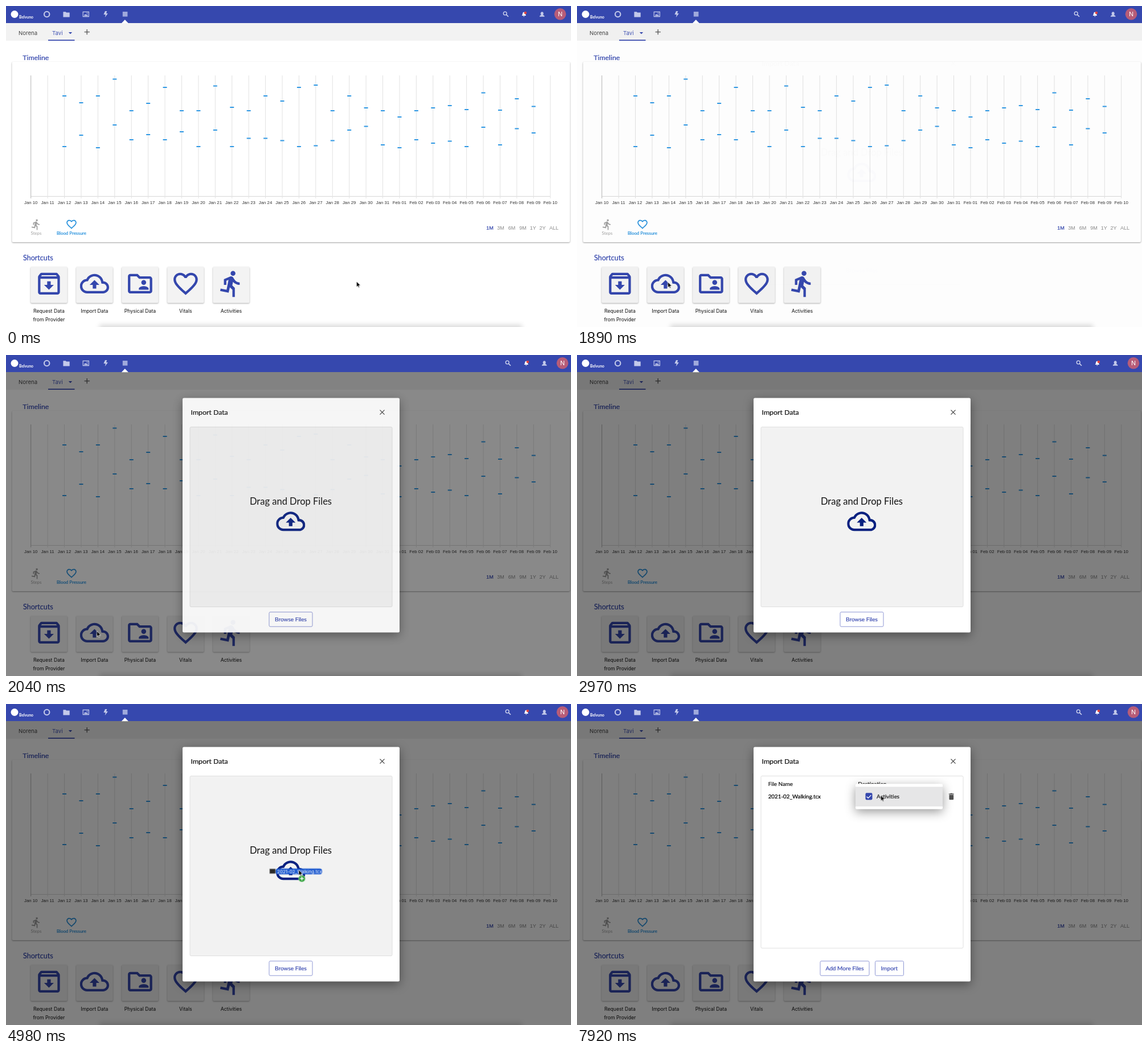
Animation, 992 px wide and 564 px high, one loop 8 s. Source, as an HTML page:

```html
<!DOCTYPE html>
<html lang="en">
<head>
<meta charset="utf-8">
<title>Import data</title>
<style>
html, body { margin: 0; width: 100%; height: 100%; overflow: hidden; background: #fff; }
svg { display: block; }
.stage { width: 992px; height: 564px; }
text { fill: currentColor; }
.lato { font-family: Lato, sans-serif; }
.inter { font-family: Inter, sans-serif; }
.arial { font-family: "Liberation Sans", Arial, sans-serif; }
.firm { stroke: currentColor; stroke-width: .22px; }
.mid { text-anchor: middle; }
.blue { color: #3447ad; }
.icon { fill: currentColor; }
.card { fill: #fff; filter: drop-shadow(0 1px 1px rgba(0,0,0,.38)); }
.tile { fill: #f3f3f3; filter: drop-shadow(0 1px 1px rgba(0,0,0,.32)); }
.sheet { fill: #fff; filter: drop-shadow(0 5px 9px rgba(0,0,0,.4)); }
.button { fill: #fff; stroke: #8e97d4; }

/* one shared 8 s clock */
.fade, .shift, .drop, .list, .line, .menu, .tick, .pointer, .arrow, .hand, .drag {
  animation: 8s linear infinite;
}
.shift, .drop, .list, .line, .tick, .arrow, .hand, .drag { animation-timing-function: step-end; }
.fade { animation-name: fade; }
.shift { animation-name: shift; }
.drop { animation-name: drop; }
.list { animation-name: list; }
.line { animation-name: line; }
.menu { animation-name: menu; transform-origin: 565.5px 162.5px; }
.tick { animation-name: tick; }
.pointer { animation-name: move; }
.arrow { animation-name: arrow; }
.hand { animation-name: hand; }
.drag { animation-name: drag; }

@keyframes fade { 0%, 23.625% { opacity: 0 } 24.375% { opacity: .75 } 26%, 100% { opacity: 1 } }
@keyframes shift { 0% { transform: none } 23.75%, 100% { transform: translate(4px, 0) } }
@keyframes drop { 0% { opacity: 1 } 66.375%, 100% { opacity: 0 } }
@keyframes list { 0% { opacity: 0 } 66.375%, 100% { opacity: 1 } }
@keyframes line { 0% { opacity: 0 } 81%, 100% { opacity: 1 } }
@keyframes tick { 0% { opacity: 0 } 97.875%, 100% { opacity: 1 } }
@keyframes drag { 0% { opacity: 0 } 50% { opacity: 1 } 66.375%, 100% { opacity: 0 } }
@keyframes hand { 0% { opacity: 0 } 81% { opacity: 1 } 86.625%, 100% { opacity: 0 } }
@keyframes arrow { 0% { opacity: 1 } 81% { opacity: 0 } 86.625%, 100% { opacity: 1 } }
@keyframes menu {
  0%, 86.25% { opacity: 0; transform: scale(.75, .56); animation-timing-function: cubic-bezier(.4, 0, .2, 1) }
  88.5%, 100% { opacity: 1; transform: none }
}
@keyframes move {
  0%, 1.5% { transform: translate(615.5px, 484px); animation-timing-function: cubic-bezier(.5, 0, .8, .7) }
  5.5% { transform: translate(425px, 466px); animation-timing-function: cubic-bezier(.2, .4, .5, 1) }
  11.25% { transform: translate(200.5px, 486.5px); animation-timing-function: ease-out }
  15%, 31% { transform: translate(159.5px, 485px); animation-timing-function: cubic-bezier(.5, 0, .8, .7) }
  33.75% { transform: translate(404px, 452px) }
  36.75% { transform: translate(949px, 236px) }
  37.125% { transform: translate(1010px, 212px) }
  37.2%, 53.125% { transform: translate(1050px, 258px); animation-timing-function: cubic-bezier(.25, .3, .35, 1) }
  62.25%, 74.5% { transform: translate(514px, 291.5px); animation-timing-function: cubic-bezier(.45, 0, .4, 1) }
  82.5% { transform: translate(543px, 165.5px); animation-timing-function: ease-out }
  84%, 92.5% { transform: translate(542.5px, 162px); animation-timing-function: ease-in-out }
  95.25%, 100% { transform: translate(533.5px, 160.5px) }
}
</style>
</head>
<body>
<svg class="stage" viewBox="0 0 992 564" xmlns="http://www.w3.org/2000/svg">
  <defs>
    <symbol id="archive" viewBox="0 0 24 24"><path d="M20.54 5.23l-1.39-1.68C18.88 3.21 18.47 3 18 3H6c-.47 0-.88.21-1.16.55L3.46 5.23C3.17 5.57 3 6.02 3 6.5V19c0 1.1.9 2 2 2h14c1.1 0 2-.9 2-2V6.5c0-.48-.17-.93-.46-1.27zM6.24 5h11.52l.83 1H5.42l.82-1zM5 19V8h14v11H5zm8.45-9h-2.9v3H8l4 4 4-4h-2.55z"/></symbol>
    <symbol id="cloud" viewBox="0 0 24 24"><path d="M19.35 10.04C18.67 6.59 15.64 4 12 4 9.11 4 6.6 5.64 5.35 8.04 2.34 8.36 0 10.91 0 14c0 3.31 2.69 6 6 6h13c2.76 0 5-2.24 5-5 0-2.64-2.05-4.78-4.65-4.96zM19 18H6c-2.21 0-4-1.79-4-4 0-2.05 1.53-3.76 3.56-3.97l1.07-.11.5-.95C8.08 7.14 9.94 6 12 6c2.62 0 4.88 1.86 5.39 4.43l.3 1.5 1.53.11c1.56.1 2.78 1.41 2.78 2.96 0 1.65-1.35 3-3 3zM8 13h2.55v3h2.9v-3H16l-4-4z"/></symbol>
    <symbol id="person" viewBox="0 0 24 24"><path d="M20 6h-8l-2-2H4c-1.1 0-1.99.9-1.99 2L2 18c0 1.1.9 2 2 2h16c1.1 0 2-.9 2-2V8c0-1.1-.9-2-2-2zm0 12H4V6h5.17l2 2H20v10zm-5-5c1.1 0 2-.9 2-2s-.9-2-2-2-2 .9-2 2 .9 2 2 2zm-4 4h8v-1c0-1.33-2.67-2-4-2s-4 .67-4 2v1z"/></symbol>
    <symbol id="heart" viewBox="0 0 24 24"><path d="M16.5 3c-1.74 0-3.41.81-4.5 2.09C10.91 3.81 9.24 3 7.5 3 4.42 3 2 5.42 2 8.5c0 3.78 3.4 6.86 8.55 11.54L12 21.35l1.45-1.32C18.6 15.36 22 12.28 22 8.5 22 5.42 19.58 3 16.5 3zm-4.4 15.55l-.1.1-.1-.1C7.14 14.24 4 11.39 4 8.5 4 6.5 5.5 5 7.5 5c1.54 0 3.04.99 3.57 2.36h1.87C13.46 5.99 14.96 5 16.5 5c2 0 3.5 1.5 3.5 3.5 0 2.89-3.14 5.74-7.9 10.05z"/></symbol>
    <symbol id="run" viewBox="0 0 24 24"><path d="M13.49 5.48c1.1 0 2-.9 2-2s-.9-2-2-2-2 .9-2 2 .9 2 2 2zm-3.6 13.9l1-4.4 2.1 2v6h2v-7.5l-2.1-2 .6-3c1.3 1.5 3.3 2.5 5.5 2.5v-2c-1.9 0-3.5-1-4.3-2.4l-1-1.6c-.4-.6-1-1-1.7-1-.3 0-.5.1-.8.1l-5.2 2.2v4.7h2v-3.4l1.8-.7-1.6 8.1-4.9-1-.4 2 7 1.4z"/></symbol>
    <symbol id="bin" viewBox="0 0 24 24"><path d="M6 19c0 1.1.9 2 2 2h8c1.1 0 2-.9 2-2V7H6v12zM19 4h-3.5l-1-1h-5l-1 1H5v2h14V4z"/></symbol>
    <path id="arrowShape" d="M0 0V9.7L2.2 7.7L3.6 11L5.2 10.3L3.8 7.1H6.8Z" fill="#000" stroke="#fff" stroke-width=".7"/>
    <filter id="soft" x="-5%" y="-100%" width="110%" height="300%"><feGaussianBlur stdDeviation="4"/></filter>
  </defs>

  <rect width="992" height="564" fill="#fff"/>
  <rect y="30" width="992" height="31" fill="#f2f2f2"/>
  <g class="inter" font-size="9.6">
    <text x="22" y="51" color="#444">Norena</text>
    <text x="81" y="51" color="#4053b4">Tavi</text>
  </g>
  <path d="M109.8 46h6.4l-3.2 3.3z" fill="#3447ad"/>
  <rect x="74" y="59.3" width="46.5" height="1.7" fill="#3447ad"/>
  <path d="M137.6 45.6h9.2M142.2 41v9.2" stroke="#555" stroke-width="1.3"/>

  <rect class="card" x="10.5" y="98" width="979.5" height="317" rx="2"/>
  <g class="lato firm blue">
    <text x="29.3" y="95" font-size="12.3">Timeline</text>
    <text x="30" y="447" font-size="12.5">Shortcuts</text>
  </g>
  <g id="chart" class="arial mid" font-size="7.8" color="#333"></g>
  <g class="lato mid" font-size="7.9">
    <g color="#a2a2a2">
      <use class="icon" href="#run" x="42.3" y="373.5" width="21" height="21"/>
      <text x="53" y="402.3">Steps</text>
    </g>
    <g color="#2b93dd">
      <use class="icon" href="#heart" x="104.5" y="373" width="21" height="21"/>
      <text class="firm" x="115" y="402.3">Blood Pressure</text>
    </g>
  </g>
  <g id="ranges" class="arial mid" font-size="9.1" color="#8a8a8a"></g>
  <rect x="164" y="560" width="742" height="20" fill="#000" opacity=".14" filter="url(#soft)"/>
  <g id="tiles" class="inter mid" font-size="8.7" color="#111"></g>

  <rect class="fade" width="992" height="564" fill="#000" fill-opacity=".5"/>

  <rect width="992" height="30" fill="#3648ae"/>
  <circle cx="15" cy="14.5" r="6.5" fill="#fff"/>
  <text class="lato" x="23" y="22" font-size="6.8" font-weight="700" color="#fff">Belvuno</text>
  <g fill="#c3c9ea">
    <circle cx="71.7" cy="14.5" r="4.7" fill="none" stroke="#c3c9ea" stroke-width="2.1"/>
    <path d="M100.4 10.2h4.4l1.2 1.4h5.7v7.9h-11.3z"/>
    <path fill-rule="evenodd" d="M134.6 9.7h11.4v9.6h-11.4zM135.8 10.9v7.2h9v-7.2zM136.6 17.4l2.4-3.4 1.8 1.8 1.4-1.2 2 2.8zM141.7 11.8h1.6v1.6h-1.6z"/>
    <path d="M174 8.9h3.2l-1.2 4h2.9l-5.1 7.2 1-5h-3.4z"/>
    <rect x="204.8" y="10" width="8.6" height="8.6" fill="#9fa9dc"/>
  </g>
  <path d="M202.8 30.2l6-6.2 6 6.2z" fill="#fff"/>
  <g class="shift">
    <circle cx="876.2" cy="13" r="2.9" fill="none" stroke="#d5d9f0" stroke-width="1.3"/>
    <path d="M878.4 15.2l3.6 3.6" stroke="#d5d9f0" stroke-width="1.6"/>
    <path d="M905.6 17c1.4-1 1.2-3.6 1.8-5 .8-1.8 3.6-1.8 4.4 0 .4 1.4.2 4 1.4 5zM907.9 17.8h2.8q-1.4 1.8-2.8 0z" fill="#fff"/>
    <circle cx="911.9" cy="12" r="2.3" fill="#e0433f"/>
    <path d="M936.8 18.8c0-2.4 1.4-2.4 2.8-3.1-1.7-2-1-5.5 1.6-5.5s3.3 3.5 1.6 5.5c1.4.7 2.8.7 2.8 3.1z" fill="#c3c9ea"/>
    <circle cx="973" cy="14.3" r="10.3" fill="#b75c78"/>
    <text class="inter mid" x="973" y="18.2" font-size="10.8" color="#fff">N</text>
  </g>

  <g class="fade">
    <rect class="sheet" x="310" y="75.5" width="381" height="412" rx="2.5"/>
    <text class="lato firm" x="324.6" y="104.7" font-size="12.3" color="#111">Import Data</text>
    <path d="M656.5 96.6l8 8m0-8l-8 8" stroke="#444" stroke-width="1.3"/>

    <g class="drop">
      <rect x="323" y="126.5" width="355" height="316" rx="2" fill="#f2f2f2" stroke="#dfdfdf"/>
      <text class="lato mid" x="500" y="262.5" font-size="16.5" color="#111">Drag and Drop Files</text>
      <use class="icon" href="#cloud" x="474.2" y="266.7" width="51.2" height="51.2" color="#0a2180"/>
      <rect class="button" x="462" y="451.7" width="76" height="25.5" rx="2"/>
      <text class="lato firm mid" x="500" y="468" font-size="10.1" color="#3d4db3">Browse Files</text>
    </g>

    <g class="list">
      <rect x="323" y="126.5" width="355" height="302.5" rx="2" fill="#fff" stroke="#dfdfdf"/>
      <g class="lato firm" font-size="9.8" color="#1c1c1c">
        <text x="335.7" y="143.5">File Name</text>
        <text x="493.3" y="143.5">Destination</text>
        <text x="335.7" y="166" color="#000">2021-02_Walking.tcx</text>
        <text x="497.5" y="166.5" color="#3d4db3">Select</text>
      </g>
      <path d="M626.6 161.2h6.8l-3.4 3.4z" fill="#3447ad"/>
      <rect x="489" y="170.5" width="153" height=".8" fill="#949494"/>
      <rect class="line" x="489" y="170.2" width="153" height="1.4" fill="#3447ad"/>
      <use class="icon" href="#bin" x="649.6" y="154.9" width="15.4" height="15.4" color="#505050"/>
      <rect class="button" x="427" y="451.7" width="86" height="25.5" rx="2"/>
      <rect class="button" x="523.5" y="451.7" width="50" height="25.5" rx="2"/>
      <g class="lato firm mid" font-size="10.1" color="#3d4db3">
        <text x="470" y="468">Add More Files</text>
        <text x="548.3" y="468">Import</text>
      </g>
    </g>
  </g>

  <g class="menu">
    <rect class="sheet" x="489" y="140.3" width="153" height="44.5" rx="2"/>
    <rect x="489" y="145.5" width="153" height="34.5" fill="#e6e6e7"/>
    <rect x="507.4" y="157.3" width="10.2" height="10.2" rx="1" fill="none" stroke="#3447ad" stroke-width="1.4"/>
    <g class="tick">
      <rect x="506.7" y="156.6" width="11.6" height="11.6" rx="1.4" fill="#3447ad"/>
      <path d="M508.6 162.7l2.7 2.6 5-5.2" fill="none" stroke="#fff" stroke-width="1.3"/>
    </g>
    <text class="lato firm" x="526" y="166" font-size="9.8" color="#222">Activities</text>
  </g>

  <g class="pointer">
    <g class="drag">
      <rect x="-51" y="-1.8" width="10" height="8" fill="#2a2a2a" stroke="#777" stroke-width=".5"/>
      <rect x="-40.5" y="-2.3" width="81.5" height="10" rx="4" fill="#1f5bd0"/>
      <text class="inter" x="-38" y="5.8" font-size="8" color="#fff">2021-02_Walking.tcx</text>
      <circle cx="5.5" cy="15.3" r="6" fill="#3aa544" stroke="#e8f5e9" stroke-width=".5"/>
      <path d="M2.2 15.3h6.6M5.5 12v6.6" stroke="#fff" stroke-width="1.5"/>
    </g>
    <use class="arrow" href="#arrowShape"/>
    <path class="hand" d="M-.9 6.2V.9Q0-.5 .9 .9V4Q2.1 3.3 2.5 4.3Q3.6 3.8 4 4.8Q5.2 4.6 5.1 6V8.2L4.2 11H-.4L-3 7.2Q-3.2 5.6-1.8 6Z" fill="#fff" stroke="#000" stroke-width=".8" stroke-linejoin="round"/>
  </g>
</svg>
<script>
const fill = (id, parts) => { document.getElementById(id).innerHTML = parts.join(''); };

// blood pressure marks from Jan 12 to Feb 09
const high = [158, 170, 158, 128.5, 184, 171, 143, 184, 184, 140.5, 178, 184, 158, 167, 143, 139,
  184, 158, 179, 184, 195, 184, 179, 175, 182, 152.5, 183, 163, 176.5];
const low = [247, 227, 249, 209, 235, 226, 235, 221, 247, 218, 247, 232.5, 232.5, 236.5, 247, 245.5,
  236.5, 218, 211.5, 244, 249, 235, 241, 237.5, 247, 213, 244, 215.5, 223];
const dayX = i => 43.7 + i * 29.42;
const dayName = i => i < 22 ? `Jan ${10 + i}` : `Feb ${String(i - 21).padStart(2, '0')}`;
const dash = (i, y) => `<rect x="${dayX(i) - 3.5}" y="${y - 1}" width="7" height="2" fill="#2f98e4"/>`;

const chart = ['<path d="M43.7 334.5H956" stroke="#d8d8d8"/>'];
for (let i = 0; i < 32; i++) {
  chart.push(`<path d="M${dayX(i)} 122V338" stroke="${i ? '#e2e2e2' : '#b4b4b4'}"/>`,
    `<text x="${dayX(i)}" y="347.6">${dayName(i)}</text>`);
}
high.forEach((y, i) => chart.push(dash(i + 2, y), dash(i + 2, low[i])));
fill('chart', chart);

const ranges = { '1M': 849.5, '3M': 868.5, '6M': 888, '9M': 907.5, '1Y': 925.3, '2Y': 942, ALL: 962 };
fill('ranges', Object.entries(ranges).map(([name, x], i) =>
  `<text x="${x}" y="393"${i ? '' : ' class="firm blue"'}>${name}</text>`));

const tiles = [['archive', 'Request Data', 'from Provider'], ['cloud', 'Import Data'],
  ['person', 'Physical Data'], ['heart', 'Vitals'], ['run', 'Activities']];
fill('tiles', tiles.map(([icon, ...lines], i) => {
  const x = 75.4 + i * 80;
  return `<rect class="tile" x="${x - 32.2}" y="458.3" width="64.4" height="63.4" rx="2"/>
    <use class="icon blue" href="#${icon}" x="${x - 25.6}" y="462.3" width="51.2" height="51.2"/>` +
    lines.map((line, n) => `<text x="${x}" y="${539 + n * 15.2}">${line}</text>`).join('');
}));
</script>
</body>
</html>
```
